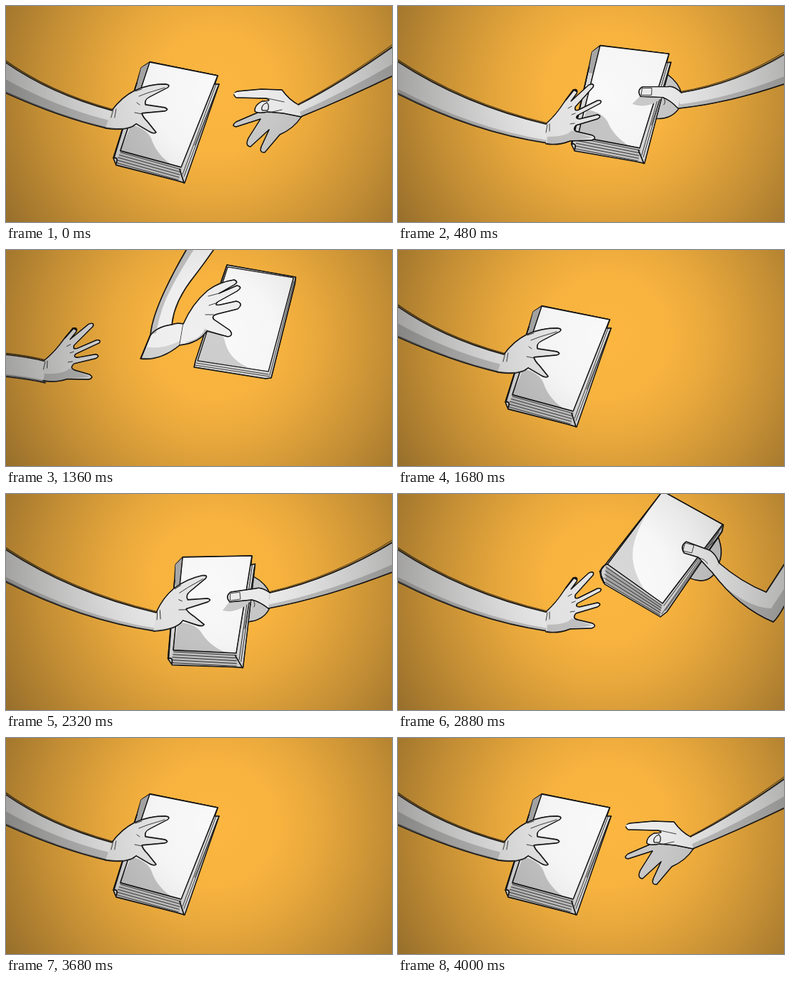
An HTML page with a canvas that plays this animation: 540x304 px, repeating every 4.08 s.

```html
<!DOCTYPE html>
<html lang="en">
<head>
<meta charset="utf-8">
<title>Passing the book</title>
<style>
  html, body { margin: 0; width: 100%; height: 100%; overflow: hidden; background: #fcb640; }
  canvas { display: block; width: 100%; height: 100%; }
</style>
</head>
<body>
<canvas id="stage"></canvas>
<script>
const W = 540, H = 304, STEP = 80, STEPS = 51, CYCLE = 25;
const INK = '#141414', SKIN = '#ededed', SHADE = '#c2c2c2', PAPER = '#f9f9f9';
const canvas = document.getElementById('stage');
const ctx = canvas.getContext('2d');
const ratio = Math.max(1, window.devicePixelRatio || 1);
canvas.width = W * ratio;
canvas.height = H * ratio;

// ---- drawing helpers
const fill = (d, color) => { ctx.fillStyle = color; ctx.fill(new Path2D(d)); };

// A firm line with a thin, slightly misplaced second pass
function ink(d, width = 1.4) {
  const path = new Path2D(d);
  ctx.strokeStyle = INK;
  ctx.lineWidth = width;
  ctx.stroke(path);
  ctx.save();
  ctx.translate(1, -1.4);
  ctx.rotate(.004);
  ctx.lineWidth = width * .5;
  ctx.stroke(path);
  ctx.restore();
}

const thin = d => { ctx.strokeStyle = INK; ctx.lineWidth = .8; ctx.stroke(new Path2D(d)); };
const shape = (d, color, width) => { fill(d, color); ink(d, width); };

function place(dx, dy, deg, px, py, draw) {
  ctx.save();
  ctx.translate(px + dx, py + dy);
  ctx.rotate(deg * Math.PI / 180);
  ctx.translate(-px, -py);
  draw();
  ctx.restore();
}

const mix = (a, b, k) => a.map((v, i) => v + (b[i] - v) * k);

function tween(keys, n) {
  const i = Math.max(1, keys.findIndex(([at]) => at >= n));
  const [t0, a] = keys[i - 1], [t1, b] = keys[i];
  const k = (n - t0) / (t1 - t0);
  return mix(a, b, k * k * (3 - 2 * k));
}

// Arm: upper curve (3 points), lower curve (3 points), shaded share, hand angle
function arm(a) {
  const top = a.slice(0, 6), low = a.slice(6, 12), mid = mix(low, top, a[12]);
  const curve = ([x, y, cx, cy, ex, ey]) => `${x} ${y} Q${cx} ${cy} ${ex} ${ey}`;
  const back = ([x, y, cx, cy, ex, ey]) => `L${ex} ${ey} Q${cx} ${cy} ${x} ${y} Z`;
  fill('M' + curve(top) + back(low), SKIN);
  fill('M' + curve(low) + back(mid), SHADE);
  ink('M' + curve(top));
  ink('M' + curve(low));
  thin('M' + curve(mix(top, low, -.07)));
}

// ---- books
function closedBook() {
  shape('M201 79 L296 98 L292 110 L298 110 L250 249 L236 245 L154 224 L150 214 L183 108 L189 87 Z', '#dadada');
  fill('M200 80 L189 87 L182 116 L188 117 Z', '#a8a8a8');
  const cover = 'M201 79 L296 98 L245 227 L160 204 Z';
  fill(cover, PAPER);
  fill('M160 204 L175 167 Q196 172 203 186 Q210 208 231 223 Z', '#c6c6c6');
  ink(cover);
  fill('M160 206 L245 229 L243 246 L153 221 Z', '#c4c4c4');
  for (let i = 0; i < 5; i++) thin(`M${160 - i * 1.7} ${206 + i * 3.6} L${245 - i} ${230 + i * 3.7}`);
  thin('M294 110 L247 237 M296 114 L249 240 M298 110 L264 196');
  ink('M183 108 L151 214 Q158 213 154 222 M243 230 L249 249', 1.6);
}

function tiltedBook() {
  shape('M370 -4 L455 43 L453 53 L376 166 L367 173 L289 127 L282 109 L291 98 Z', '#d2d2d2');
  const cover = 'M370 -4 L454 43 L370 154 L293 99 Z';
  fill(cover, '#d8d8d8');
  fill('M370 -4 L454 43 L370 154 L347 138 Q321 100 331 66 Q342 30 370 -4 Z', '#fbfbfb');
  ink(cover);
  fill('M291 101 L369 156 L366 171 L290 125 Z', '#a4a4a4');
  for (let i = 0; i < 5; i++) thin(`M${291 - i} ${103 + i * 5} L${369 - i * .6} ${157 + i * 3.4}`);
  thin('M453 47 L372 157 M454 51 L374 164 M449 54 L369 169');
  ink('M292 99 Q281 103 284 117 L288 125', 1.8);
}

function plainBook() {
  shape('M309 21 L405 38 L404 47 L371 180 L363 181 L263 165 L265 156 Z', '#d8d8d8', 1.5);
  const cover = 'M310 24 L402 39 L367 171 L268 156 Z';
  fill(cover, '#fafafa');
  fill('M268 156 L282 108 Q304 112 307 132 Q314 155 340 166 Z', '#cecece');
  ink(cover, 1.1);
  thin('M264 162 L369 178 M266 159 L367 175 M403 44 L369 176 M309 21 L297 54');
}

// ---- hands
function graspingHand() {
  const hand = 'M148 147 Q162 128 180 119 Q200 110 222 110 Q231 111 226 115 L201 128 ' +
    'Q193 132 195 139 L222 143 Q229 146 222 148 L190 151 Q191 156 198 163 L210 178 ' +
    'Q207 181 199 176 L182 166 Q171 177 139 172';
  fill(hand, '#e6e6e6');
  ink(hand);
  thin('M150 146 L147 157 M154 145 L152 157 M181 120 L190 117 M186 127 L199 122 L222 115 M183 136 L187 139 M180 150 L190 152');
}

function openHand() {
  const hand = 'M208 165 Q222 152 232 136 L245 118 Q252 116 250 123 L242 134 L267 111 ' +
    'Q275 108 273 114 L248 142 Q246 149 253 146 L279 133 Q286 132 283 137 L251 154 ' +
    'Q247 159 254 159 L279 153 Q286 155 279 159 L249 168 Q243 175 251 177 L272 182 ' +
    'Q279 186 271 189 L241 190 Q224 197 207 194';
  fill(hand, '#e6e6e6');
  fill('M208 194 L209 184 Q236 184 243 175 L272 185 L241 190 Q224 197 208 194 Z', SHADE);
  ink(hand);
  ink('M235 132 L246 118 L250 120', 2);
  thin('M209 167 L207 178 M212 166 L212 176 M238 144 L243 141 M243 153 L248 151 M241 166 L247 165');
}

function reachingHand() {
  shape('M400 146 L352 150 L322 163 Q314 169 322 170 L356 159 L339 186 Q334 197 342 198 ' +
    'L368 174 L357 198 Q354 207 362 206 L383 181 Q403 172 413 156 Z', '#cbcbcb');
  const back = 'M409 139 Q396 132 386 118 L357 117 L324 120 Q315 124 322 129 L364 130 ' +
    'Q374 134 358 134 Q347 140 348 148 Q352 152 366 149 L388 151 L413 156';
  fill(back, SKIN);
  ink(back);
  fill('M318 123 L324 121 L323 128 Z', '#fff');
  ink('M365 136 Q356 139 358 147 L366 147 Q369 140 365 136', 1);
  thin('M366 130 L389 135 M368 150 L386 146');
}

function palmBehind() {
  shape('M346 116 Q364 126 369 140 L369 160 Q361 178 338 180 Z', '#c9c9c9');
}

function thumb() {
  fill('M313 151 L303 164 Q318 168 334 158 L345 148 Z', '#cbcbcb');
  const d = 'M369 139 Q357 130 349 133 L314 138 Q306 144 313 152 L344 149 Q354 151 367 161';
  fill(d, SKIN);
  ink(d);
  thin('M314 140 L327 138 L328 148 L314 150 Z M345 149 Q350 154 347 159');
}

// ---- right arm, bent and pulling the book away
function pull() {
  shape('M448 61 Q456 83 448 99 Q443 121 424 122 Q411 121 405 116 Z', '#c9c9c9');
  tiltedBook();
  const limb = 'M449 97 Q480 124 515 138 L542 96 L610 -20 L660 0 L540 158 Q532 173 525 180 Q477 160 440 111';
  fill(limb, SKIN);
  fill('M525 180 Q490 166 461 134 Q496 161 522 161 L541 132 L620 20 L660 0 L540 158 Q533 172 525 180 Z', SHADE);
  ink(limb);
  const grip = 'M449 97 Q443 80 430 77 L403 67 Q394 73 400 83 L420 89 Q428 98 440 111';
  fill(grip, SKIN);
  ink(grip);
  thin('M402 69 L414 72 L411 83 L399 80 Z M421 90 Q429 91 433 98 M433 76 L447 62');
}

// ---- arm reaching down from above
function dropArm() {
  const limb = 'M290 -60 Q247 3 222 57 Q204 96 202 119 L188 153 Q215 157 243 134 ' +
    'L248 104 Q239 102 232 105 Q235 72 264 36 Q290 2 330 -60';
  fill(limb, '#f2f2f2');
  fill('M290 -60 Q247 3 222 57 Q204 96 202 119 L210 117 Q216 81 233 50 Q255 8 303 -60 Z', SHADE);
  fill('M188 153 L194 136 Q218 141 243 128 L243 134 Q215 157 188 153 Z', '#d5d5d5');
  ink(limb);
  ink('M232 105 Q211 108 202 120 L189 152', 1.6);
  const hand = 'M248 104 Q260 76 282 57 Q298 45 319 42 Q326 45 319 49 L298 61 L323 50 ' +
    'Q332 52 323 58 L296 73 Q290 79 300 77 L322 72 Q333 75 324 83 L296 90 Q286 93 291 98 ' +
    'L313 113 Q319 121 310 122 L281 114 Q270 131 243 134';
  fill(hand, '#f0f0f0');
  fill('M250 130 Q272 126 278 111 L310 122 L281 114 Q270 131 250 130 Z', SHADE);
  ink(hand);
  thin('M283 65 L298 61 M284 78 L296 74 M279 91 L291 91');
}

// ---- motion tables
const HOLD = [-4, 77, 60, 123, 148, 147, -4, 121, 75, 157, 140, 172, .45, 0];
const FAR = [-4, 76, 90, 139, 210, 167, -4, 122, 105, 178, 208, 193, .16, -12.5];
const BACK = [-4, 147, 28, 150, 56, 157, -4, 178, 28, 181, 55, 187, .12, 3];
const LEFT = [[0, HOLD], [4, FAR], [12, FAR], [17, BACK], [21, HOLD], [25, HOLD]];

const REACH = [545, 54, 470, 108, 409, 139, 545, 96, 480, 128, 412, 156, .4];
const GRIP = [545, 65, 460, 118, 369, 139, 545, 108, 450, 145, 367, 161, .25];

const reachShift = { 22: [95, -42], 23: [44, -20], 24: [10, -5], 0: [0, 0], 1: [-4, 1], 2: [-16, 3] };
const passShift = { 3: [0, 0, 0], 4: [0, 0, 0], 5: [9, -6, 3], 6: [26, -17, 8], 7: [45, -28, 15] };
const pullShift = { 8: [-20, 13, -8], 9: [-9, 6, -4], 10: [-3, 2, -1], 11: [0, 0, 0], 12: [0, 0, 0],
  13: [36, -28, 4], 14: [115, -85, 9] };
const dropShift = { 15: [70, -150], 16: [24, -52], 17: [0, 0], 18: [-28, 16], 19: [-76, 40], 20: [-62, -85] };

// Moves an arm's wrist fully and its middle halfway; the shoulder stays
const bend = (a, dx, dy) => a.map((v, i) =>
  i > 11 ? v : v + [0, 0, dx / 2, dy / 2, dx, dy][i % 6]);

// Darkens everything, drawn figures included, towards the edges
function vignette() {
  const g = ctx.createRadialGradient(292, 122, 0, 292, 122, 350);
  [[0, 0], [.25, .02], [.4, .08], [.55, .16], [.7, .25], [.85, .35], [1, .45]]
    .forEach(([at, dark]) => g.addColorStop(at, `rgba(20,18,16,${dark})`));
  ctx.fillStyle = g;
  ctx.fillRect(0, 0, W, H);
}

function drawLeft(n, a) {
  const grasps = n < 6 || n > 19;
  arm(a);
  if (grasps) place(a[4] - 148, a[5] - 147, a[13], 148, 147, graspingHand);
  else place(a[4] - FAR[4], a[5] - FAR[5], n > 12 ? Math.max(0, a[13]) : 0, 208, 165, openHand);
}

function drawStep(n) {
  const left = tween(LEFT, n);
  const reach = reachShift[n], pass = passShift[n], pulled = pullShift[n], drop = dropShift[n];
  const hold = draw => place(left[4] - 148, left[5] - 147, left[13], 148, 147, draw);
  ctx.fillStyle = '#fcb640';
  ctx.fillRect(0, 0, W, H);

  if (reach) {
    arm(bend(REACH, ...reach));
    place(...reach, 0, 408, 140, reachingHand);
  }
  if (pass) {
    const [dx, dy, deg] = pass;
    const turn = draw => place(dx, dy, deg, 368, 150, draw);
    turn(palmBehind);
    if (n < 5) hold(closedBook);
    else turn(() => place(FAR[4] - 148, FAR[5] - 147, FAR[13], 148, 147, closedBook));
    arm(bend(GRIP, dx, dy));
    turn(thumb);
  } else if (n < 3 || n > 19) {
    hold(closedBook);
  }
  drawLeft(n, left);
  if (pulled) place(...pulled, 445, 105, pull);
  if (drop) {
    place(...drop, 0, 0, 0, () => {
      if (n < 20) plainBook();
      dropArm();
    });
  }
  vignette();
}

let shown = -1;
function tick() {
  const step = Math.floor(performance.now() / STEP) % STEPS;
  if (step !== shown) {
    shown = step;
    ctx.setTransform(ratio, 0, 0, ratio, 0, 0);
    ctx.lineJoin = ctx.lineCap = 'round';
    drawStep(step % CYCLE);
  }
  requestAnimationFrame(tick);
}
tick();
</script>
</body>
</html>
```
